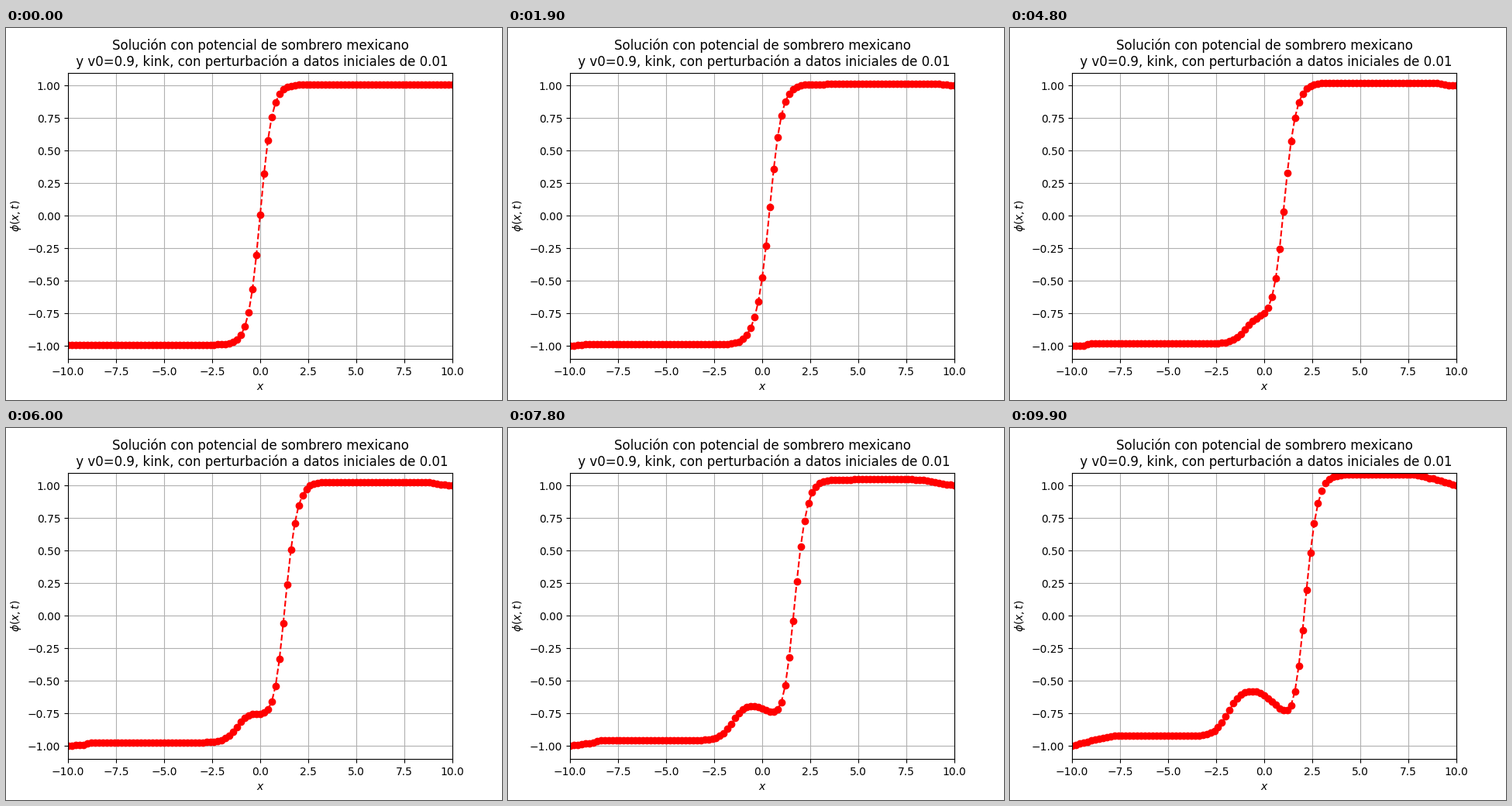
A matplotlib script that plays this animation: 640x480 px, repeating every 10 s.

```python
import numpy as np
import matplotlib.pyplot as plt
from matplotlib.animation import FuncAnimation

FRAMES, INTERVAL = 100, 100
V0, EPS = 0.9, 0.01
DX, DT = 0.2, 0.02

x = np.linspace(-10, 10, 101)


def accel(phi):
    """Right-hand side of phi_tt = phi_xx - phi + phi^3 on inner points."""
    a = np.zeros_like(phi)
    mid = phi[1:-1]
    a[1:-1] = (phi[2:] - 2 * mid + phi[:-2]) / DX**2 - mid + mid**3
    return a


def clamp(phi):
    phi[0], phi[-1] = -1, 1
    return phi


def solve():
    """Leapfrog evolution of a boosted, slightly shifted kink."""
    k = 1 / np.sqrt(2 * (1 - V0**2))
    kink = np.tanh(k * x)
    speed = -V0 * k * (1 - kink**2)
    phi = [kink + EPS]
    phi.append(clamp(phi[0] + DT * speed + DT**2 / 2 * accel(phi[0])))
    while len(phi) < FRAMES:
        phi.append(clamp(2 * phi[-1] - phi[-2] + DT**2 * accel(phi[-1])))
    return phi


phi = solve()

fig, ax = plt.subplots(figsize=(6.4, 4.8), dpi=100)
line, = ax.plot(x, phi[0], "ro--")
ax.set_xlim(-10, 10)
ax.set_ylim(-1.1, 1.1)
ax.set_xlabel("$x$")
ax.set_ylabel(r"$\phi(x,t)$")
ax.set_title("Solución con potencial de sombrero mexicano\n"
             " y v0=0.9, kink, con perturbación a datos iniciales de 0.01")
ax.grid(True)


def update(i):
    line.set_ydata(phi[i])
    return line,


anim = FuncAnimation(fig, update, frames=FRAMES, interval=INTERVAL,
                     repeat=True, repeat_delay=0)
plt.show()
```
